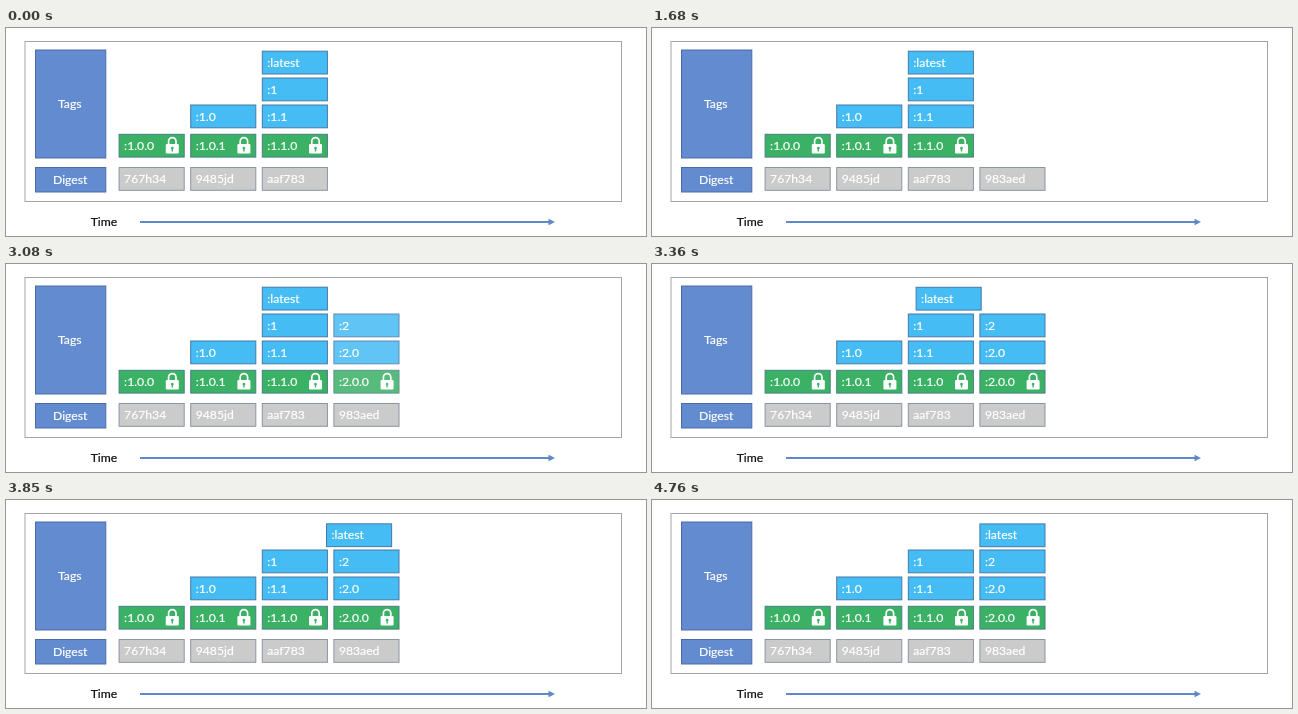
Animation of 640 by 208 pixels, one loop 4.83 s. Source, as an HTML page:

```html
<!DOCTYPE html>
<html lang="en">
<head>
<meta charset="utf-8">
<title>Image tags over time</title>
<style>
  html, body { margin: 0; width: 100%; height: 100%; overflow: hidden; background: #fff; }
  svg { display: block; width: 640px; height: 208px; }
  text { font: 12.2px Carlito, Lato, sans-serif; fill: #fff; stroke: #fff; stroke-width: .22px; }
  .head { fill: #638bd0; stroke: #4a6ba6; }
  .blue { fill: #46bcf4; stroke: #4679a6; }
  .green { fill: #3bb166; stroke: #477f83; }
  .grey { fill: #cbcbcb; stroke: #8c93a3; }
  .mid { text-anchor: middle; }
  .time { fill: #111; stroke: #111; }
</style>
</head>
<body>
<svg viewBox="0 0 640 208">
  <defs>
    <g id="lock">
      <path d="M-3.7 0V-4.2a3.7 3.7 0 0 1 7.4 0V0" fill="none" stroke="#fff" stroke-width="1.7"/>
      <rect x="-6.5" y="-1.5" width="13" height="9.5" rx="1.2" fill="#fff"/>
      <path d="M0 1.2a1.4 1.4 0 0 1 .7 2.6V6h-1.4V3.8A1.4 1.4 0 0 1 0 1.2" fill="#3bb166"/>
    </g>
  </defs>
  <rect x="19" y="13.5" width="596.5" height="160" fill="#fff" stroke="#a3a3a3"/>
  <rect class="head" x="29.5" y="22" width="70.3" height="108"/>
  <text class="mid" x="63.8" y="80.2">Tags</text>
  <rect class="head" x="29.5" y="139.5" width="70.3" height="24.5"/>
  <text class="mid" x="64.2" y="156.2">Digest</text>
  <text class="time" x="84.7" y="198.2">Time</text>
  <path d="M134 194H544" stroke="#5f88c6" stroke-width="1.8"/>
  <path d="M542.5 190.7L549 194L542.5 197.3Z" fill="#5f88c6"/>
  <g id="fixed"></g>
  <g id="digest" opacity="0"></g>
  <g id="release" opacity="0"></g>
  <g id="latest"></g>
</svg>
<script>
const LOOP = 4830, STEP = 70, COLUMN = 71.6;
const rowY = [23.2, 50, 77, 106.3, 139.5];
const byId = id => document.getElementById(id);

function addTag(group, column, row, label) {
  const x = 113.1 + column * COLUMN, y = rowY[row];
  const kind = ['blue', 'blue', 'blue', 'green', 'grey'][row];
  const lock = row === 3 ? `<use href="#lock" x="${x + 53.2}" y="${y + 11.2}"/>` : '';
  byId(group).insertAdjacentHTML('beforeend',
    `<rect class="${kind}" x="${x}" y="${y}" width="65.1" height="22.8"/>
     <text x="${x + 5}" y="${y + 15.5}">${label}</text>${lock}`);
}

// Each list runs upwards from the digest row.
const columns = [
  ['767h34', ':1.0.0'],
  ['9485jd', ':1.0.1', ':1.0'],
  ['aaf783', ':1.1.0', ':1.1', ':1']
];
columns.forEach((labels, column) =>
  labels.forEach((label, i) => addTag('fixed', column, 4 - i, label)));
addTag('digest', 3, 4, '983aed');
[':2.0.0', ':2.0', ':2'].forEach((label, i) => addTag('release', 3, 3 - i, label));
addTag('latest', 2, 0, ':latest');

const progress = (t, start, length) => Math.min(1, Math.max(0, (t - start) / length));
const ease = p => p < 0.5 ? 2 * p * p : 1 - 2 * (1 - p) ** 2;

// The clock advances in discrete steps, so motion is held between them.
function draw(now) {
  const t = Math.floor(now % LOOP / STEP) * STEP;
  byId('digest').setAttribute('opacity', progress(t, 1050, 490));
  byId('release').setAttribute('opacity', progress(t, 2660, 490));
  const moved = ease(progress(t, 3148, 908));
  byId('latest').setAttribute('transform', `translate(${COLUMN * moved} ${0.7 * moved})`);
}

let start;
function tick(now) {
  start ??= now;
  draw(now - start);
  requestAnimationFrame(tick);
}
draw(0);
requestAnimationFrame(tick);
</script>
</body>
</html>
```
